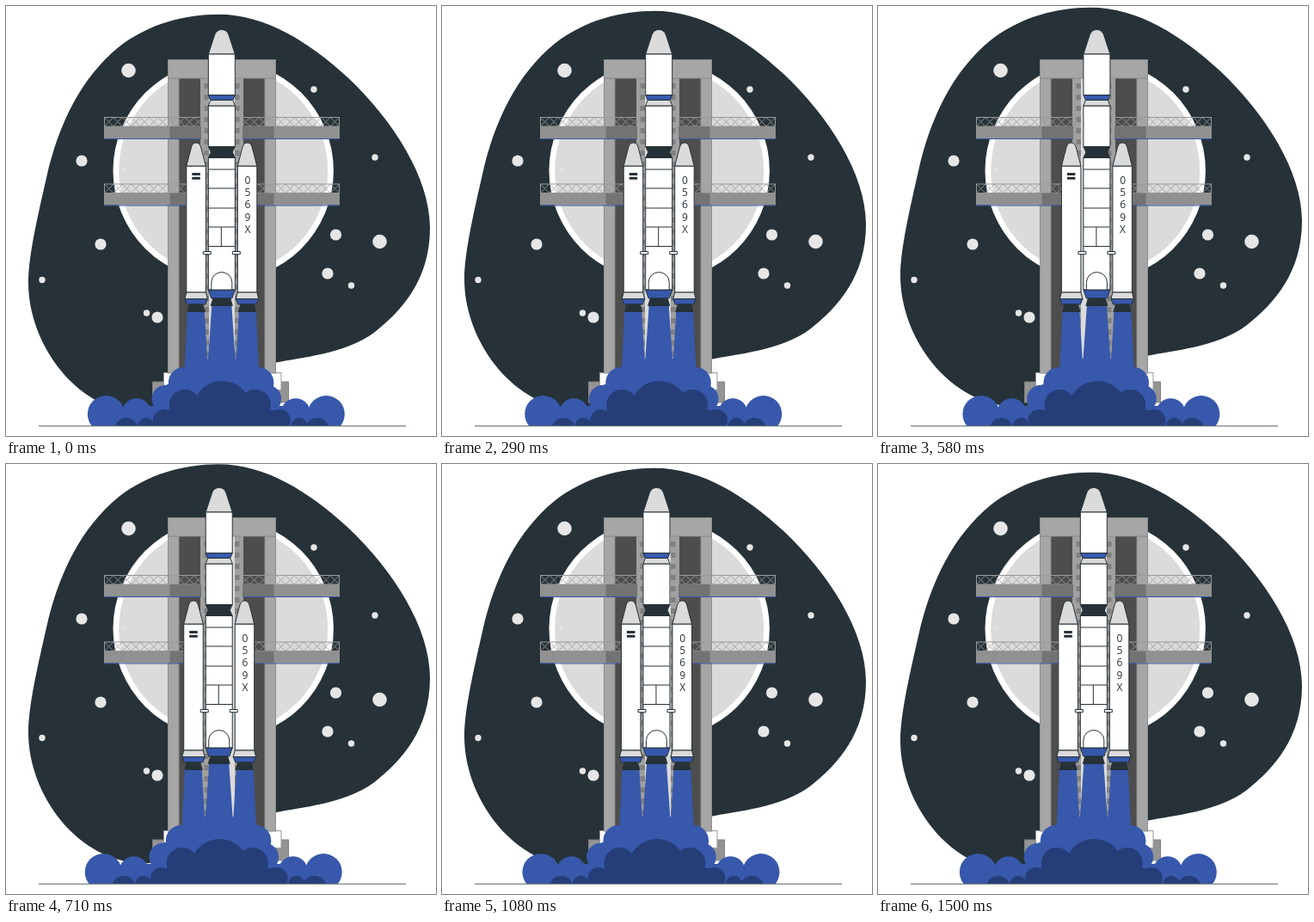
An HTML page that plays this animation: 500 by 500 pixels, repeating every 1540 ms.

```html
<!DOCTYPE html>
<html lang="en">
<head>
<meta charset="utf-8">
<title>Rocket launch</title>
<style>
  html, body { margin: 0; width: 100%; height: 100%; overflow: hidden; background: #fff; }
  svg { display: block; width: 100%; height: 100%; }
  .ink { fill: none; stroke: #263238; stroke-linejoin: round; }
  .white { fill: #fff; }
  .pale { fill: #dbdbdb; }
  .blue { fill: #3758ab; }
  .navy { fill: #253e78; }
  .dark { fill: #263238; }
  .stars { stroke: #e6e6e6; stroke-linecap: round; }
  text { font: 500 12px "Open Sans", sans-serif; font-stretch: 75%; text-anchor: middle; fill: #263238; }
</style>
</head>
<body>
<svg viewBox="0 0 500 500">
  <defs>
    <pattern id="truss" width="10.4" height="10.5" x="114.5" y="129.5" patternUnits="userSpaceOnUse">
      <path d="M0 0L10.4 10.5M0 10.5L10.4 0" stroke="#999" stroke-width=".9"/>
    </pattern>
    <pattern id="rungs" width="12" height="13" x="226" y="90" patternUnits="userSpaceOnUse">
      <rect x="4.5" width="5.5" height="6" fill="#808080"/>
    </pattern>
    <clipPath id="aboveGround"><rect width="500" height="488"/></clipPath>

    <g id="deck">
      <rect x="114.5" y="129.5" width="112" height="10.5" fill="url(#truss)" stroke="#999"/>
      <rect x="114" y="140" width="77" height="14" fill="#919191"/>
      <rect x="190.5" y="140" width="36.5" height="14" fill="#737373"/>
      <path d="M114 154.5H227" stroke="#3758ab"/>
    </g>

    <g id="towerHalf">
      <rect x="201" y="84" width="26" height="343" fill="#4d4d4d"/>
      <rect x="188.5" y="84" width="12.5" height="343" fill="#a6a6a6" stroke="#8c8c8c"/>
      <rect x="226" y="84" width="10" height="343" fill="#a0a0a0"/>
      <rect x="226" y="84" width="10" height="343" fill="url(#rungs)"/>
    </g>

    <g id="booster" class="ink">
      <path class="white" d="M210 186H232.5V333H210Z"/>
      <path class="pale" d="M210 186L215.7 164Q217.2 159 221.2 159T226.8 164L232.5 186Z"/>
      <path class="pale" d="M210 333H232.5L234.5 340.5H208Z"/>
      <path class="blue" d="M208 340.5H234.5L232 347H210.5Z"/>
      <path class="dark" d="M213.5 347H229L231.5 355.5H211.5Z"/>
      <rect class="white" x="229.5" y="285.5" width="9" height="3.2"/>
    </g>
  </defs>

  <path id="sky" class="dark" d="M247 10C302 10 352 42 397 83C450 133 493 200 493 258C493 318 461 354 428 380C394 405 342 409 313 415C260 424 230 470 165 474C85 476 26 395 26 322C26 290 38 240 47 200C61 137 88 83 131 48C166 21 207 10 247 10Z"/>
  <g class="stars">
    <path stroke-width="16.6" d="M142.5 75h0M434.5 274h0"/>
    <path stroke-width="13.2" d="M88 180h0M110 277h0M176 362h0M383.5 266h0M374 311h0"/>
    <path stroke-width="7.4" d="M358 97h0M429 176h0M42 318.5h0M163.5 357h0M401.5 325h0"/>
  </g>

  <circle class="white" cx="252.7" cy="191.5" r="128.2"/>
  <circle class="pale" cx="252.7" cy="191.5" r="121.5"/>
  <path d="M135 190H141M138 187V193" stroke="#e8e8e8"/>

  <rect x="170.5" y="437" width="158" height="24" fill="#949494" stroke="#808080"/>
  <rect x="183.5" y="426.5" width="136.5" height="20" fill="#fff" stroke="#999"/>
  <rect class="pale" x="235" y="84" width="32" height="343"/>
  <use href="#towerHalf"/>
  <use href="#towerHalf" transform="matrix(-1 0 0 1 502 0)"/>
  <rect x="188.5" y="62.5" width="125" height="21.5" fill="#a6a6a6" stroke="#8c8c8c"/>
  <g id="decks">
    <use href="#deck"/>
    <use href="#deck" y="77.5"/>
  </g>
  <use href="#decks" transform="matrix(-1 0 0 1 502 0)"/>

  <g id="rocket">
    <path class="blue" d="M211 355H231L234.7 417L239.5 348H262.5L267.3 417L271 355H291L295 440H207Z"/>

    <g class="ink">
      <path class="pale" d="M235.5 56L243 33Q245.5 27.5 251 27.5T259 33L266.5 56Z"/>
      <path class="white" d="M235.5 56H266.5V103.5H235.5ZM235.5 116H266.5V163.5H235.5ZM235.5 176.5H266.5V330H235.5Z"/>
      <path class="blue" d="M235.5 103.5H266.5L264 109.5H238Z"/>
      <path class="pale" d="M238 109.5H264L266.5 116H235.5Z"/>
      <path class="dark" d="M235.5 163.5H266.5L263.5 170L266.5 176.5H235.5L238.5 170Z"/>
      <path d="M235.5 190h31m-31 22h31m-31 23h31m-31 22h31m-31 22.5h31M250.5 257v22.5"/>
      <path class="blue" d="M235.5 330H266.5L263 340H239Z"/>
      <path class="white" d="M239 330V321.5a12 12 0 0 1 24 0V330Z"/>
      <path class="dark" d="M241 340H261L263.5 348.5H238.5Z"/>
    </g>
    <use href="#booster"/>
    <use href="#booster" transform="matrix(-1 0 0 1 502 0)"/>
    <path class="dark" d="M216.5 194h9.5v3h-9.5zm0 4.7h9.5v3h-9.5z"/>
    <g id="serial"></g>

    <g clip-path="url(#aboveGround)">
      <g id="smoke" class="blue"><path d="M116 478H372V490H116ZM166 465H324V490H166ZM187 440H311V470H187Z"/></g>
      <g id="smokeCore" class="navy"><path d="M190 470H312V490H190Z"/></g>
    </g>
  </g>
  <path d="M38 488.3H465" stroke="#5b6468"/>
</svg>
<script>
const byId = id => document.getElementById(id);

function add(parent, tag, attributes, content = '') {
  const node = document.createElementNS('http://www.w3.org/2000/svg', tag);
  for (const name in attributes) node.setAttribute(name, attributes[name]);
  node.textContent = content;
  byId(parent).append(node);
}

// Two equal puffs of smoke, dx to either side of an axis.
function addPuffs(parent, axis, dx, cy, r) {
  for (const cx of [axis - dx, axis + dx]) add(parent, 'circle', { cx, cy, r });
}

addPuffs('smoke', 244.5, 128, 474.5, 21.5);
addPuffs('smoke', 244.5, 92.5, 473, 16.8);
addPuffs('smoke', 245, 59, 457, 16.3);
addPuffs('smoke', 250.3, 43.3, 438, 18);
add('smoke', 'circle', { cx: 251, cy: 440, r: 34 });

addPuffs('smokeCore', 251, 111, 493, 14);
addPuffs('smokeCore', 252, 89, 488, 9.3);
addPuffs('smokeCore', 251, 67, 482, 13);
addPuffs('smokeCore', 249, 41, 464, 18);
add('smokeCore', 'circle', { cx: 251.5, cy: 470, r: 34 });

[...'0569X'].forEach((char, i) => add('serial', 'text', { x: 281.2, y: 206.5 + i * 14.4 }, char));

const LOOP = 1540, PERIOD = 1500, OFFSET = 28, FPS = 24;

// Shake pose at each tenth of the period: alternates sides, doubling up to 4px at mid-period.
function pose(tenth) {
  const k = Math.min(tenth, 10 - tenth);
  return k ? (-1) ** k * Math.min(4, 2 ** (k - 1)) : 0;
}

function draw(now) {
  const step = Math.floor((now % LOOP + 5) * FPS / 1000);
  const phase = (step * 1000 / FPS + OFFSET) / PERIOD % 1;
  const lift = -10 * (1 - Math.abs(1 - 2 * phase));
  const tenth = Math.floor(phase * 10);
  const shift = pose(tenth) + (pose(tenth + 1) - pose(tenth)) * (phase * 10 - tenth);
  byId('sky').setAttribute('transform', `translate(0 ${lift})`);
  byId('rocket').setAttribute('transform', `translate(${shift} 0)`);
}

const start = performance.now();
function tick() {
  draw(performance.now() - start);
  requestAnimationFrame(tick);
}
tick();
</script>
</body>
</html>
```
